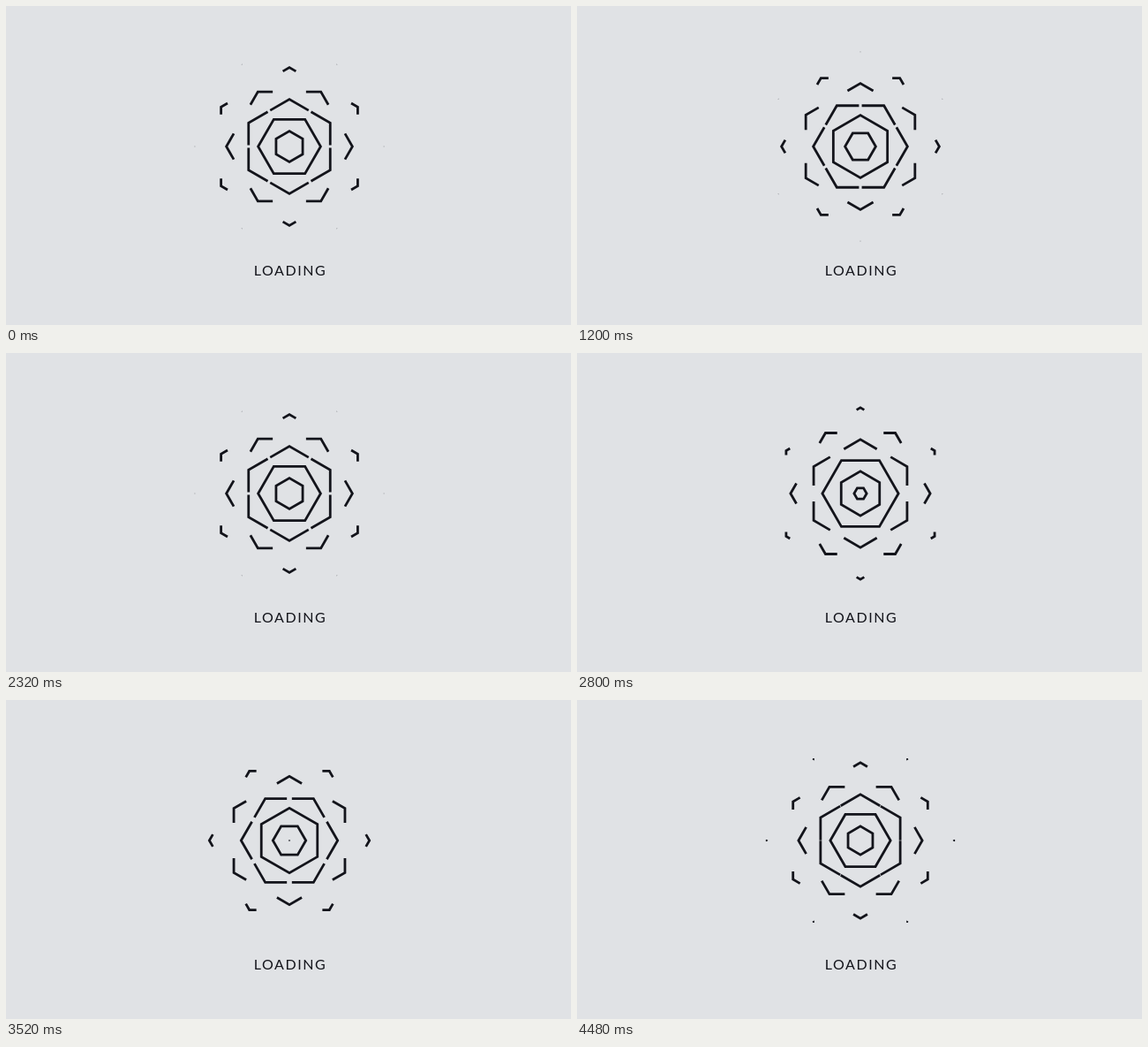
Recreate the animation shown at these times as an HTML page. Size 640 by 361 pixels, loop 4.56 s.

```html
<!DOCTYPE html>
<html lang="en">
<head>
<meta charset="utf-8">
<title>Loading</title>
<style>
  html, body { margin: 0; width: 100%; height: 100%; overflow: hidden; background: #e0e2e5; }
  svg { display: block; width: 640px; height: 361px; }
  #rings { fill: none; stroke: #13141b; }
  text { font: 16px Lato, "Open Sans", sans-serif; letter-spacing: 1.55px; fill: #13141b; text-anchor: middle; }
</style>
</head>
<body>
<svg viewBox="0 0 640 361">
  <g id="rings" transform="translate(321 159)"></g>
  <text x="322" y="305">LOADING</text>
</svg>
<script>
const LOOP = 4560, STEP = 80, GAP = 18, STEPS_PER_GAP = 14, END = 108;
const group = document.getElementById('rings');
const rings = Array.from({ length: 7 }, () =>
  group.appendChild(document.createElementNS('http://www.w3.org/2000/svg', 'path')));

const point = (x, y) => x.toFixed(3) + ' ' + y.toFixed(3);

// A whole hexagon, or only its corners once the arms are shorter than half a side.
function hexagon(r, pointy) {
  const corners = Array.from({ length: 6 }, (_, i) => {
    const a = (i + (pointy ? 0.5 : 0)) * Math.PI / 3;
    return [r * Math.cos(a), r * Math.sin(a)];
  });
  const share = 0.46 * (END - r) / r;
  if (share >= 0.5) return 'M' + corners.map(c => point(...c)).join('L') + 'Z';
  return corners.map(([x, y], i) => {
    const toward = j => {
      const [u, v] = corners[(i + j) % 6];
      return point(x + (u - x) * share, y + (v - y) * share);
    };
    return `M${toward(5)}L${point(x, y)}L${toward(1)}`;
  }).join('');
}

function draw(time) {
  // The first pose is held for two steps.
  const step = Math.max(0, Math.floor(time % LOOP / STEP) - 1);
  const turn = Math.floor(step / STEPS_PER_GAP);
  const shift = GAP * (step % STEPS_PER_GAP) / STEPS_PER_GAP - 0.6;
  rings.forEach((ring, k) => {
    const r = GAP * k + shift;
    const visible = r > 0 && r < END;
    ring.setAttribute('d', visible ? hexagon(r, (k + turn) % 2 === 1) : '');
    ring.setAttribute('stroke-width', Math.max(0, Math.min(2.8, r, 1.2 * (END - r))));
  });
}

const start = performance.now();
function tick() {
  draw(performance.now() - start);
  requestAnimationFrame(tick);
}
tick();
</script>
</body>
</html>
```
